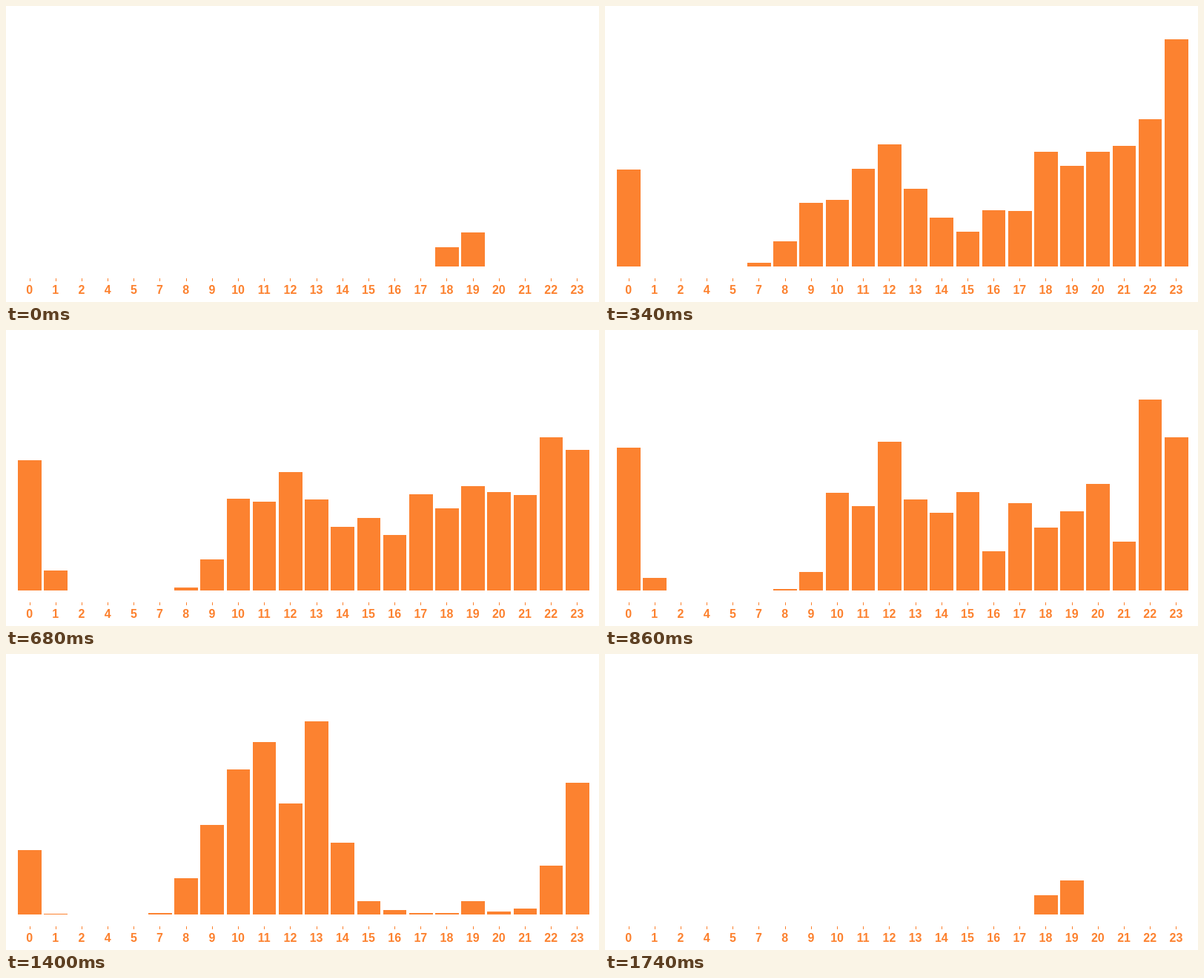
Animation, 800 px wide and 400 px high, one loop 1.76 s. Source, as an HTML page:

```html
<!DOCTYPE html>
<html lang="en">
<head>
<meta charset="utf-8">
<title>Activity by hour</title>
<style>
  html, body { margin: 0; width: 100%; height: 100%; overflow: hidden; background: #fff; }
  svg { display: block; width: 800px; height: 400px; fill: #fc8230; }
  text { font: bold 16px "Liberation Sans", Arial, sans-serif; text-anchor: middle; }
</style>
</head>
<body>
<svg id="chart" viewBox="0 0 800 400"></svg>
<script>
const LOOP = 1760, STEP = 20, BASE = 352;
const PITCH = 35.18, LEFT = 16.2, WIDTH = 31.66;
const hours = [...Array(24).keys()].filter(h => h !== 3 && h !== 6);
const column = hour => hours.indexOf(hour);

// Bar heights: hours 0 to 2, then 7 to 23; hours 4 and 5 stay empty.
const day = (night, rest) => [...night, 0, 0, ...rest];
const mean = (...days) => hours.map((_, i) => days.reduce((sum, d) => sum + d[i], 0) / days.length);
const withPeak = (heights, hour, value) => heights.map((v, i) => i === column(hour) ? value : v);

const quiet = hours.map(h => h === 18 ? 26 : h === 19 ? 46 : 0);
const surge = day([131, 0, 0], [5, 34, 86, 90, 132, 165, 105, 66, 47, 76, 75, 155, 136, 155, 163, 199, 307]);
const steady = day([161, 35, 0], [0, 5, 57, 118, 126, 126, 123, 70, 69, 93, 140, 133, 169, 123, 182, 163, 176]);
const late = day([193, 17, 0], [0, 2, 25, 132, 114, 201, 123, 105, 133, 53, 118, 85, 107, 144, 66, 258, 207]);
const mixed = day([202, 50, 30], [0, 9, 55, 116, 197, 112, 111, 60, 108, 44, 44, 116, 104, 178, 66, 116, 125]);
const noon = day([87, 1, 0], [2, 49, 121, 196, 233, 150, 261, 97, 18, 6, 2, 2, 18, 4, 8, 66, 178]);
const fading = day([120, 22, 0], [0, 30, 70, 115, 130, 135, 140, 105, 120, 130, 43, 43, 100, 87, 174, 203, 160]);

const keys = [
  [0, quiet],
  [174, withPeak(mean(surge, steady, late, mixed), 23, 329)],
  [340, surge],
  [500, steady],
  [696, mean(steady, late)],
  [860, late],
  [1080, mixed],
  [1218, withPeak(mean(mixed, noon), 11, 288)],
  [1400, noon],
  [1566, fading],
  [1740, quiet]
];

const chart = document.getElementById("chart");
function add(tag, attrs) {
  const node = document.createElementNS("http://www.w3.org/2000/svg", tag);
  for (const name in attrs) node.setAttribute(name, attrs[name]);
  return chart.appendChild(node);
}

const bars = hours.map((hour, i) => {
  const start = LEFT + i * PITCH, x = Math.round(start);
  const center = start + WIDTH / 2;
  add("rect", { x: Math.floor(center), y: 368, width: 1, height: 4 });
  add("text", { x: center - 0.4, y: 389 }).textContent = hour;
  return add("rect", { x, width: Math.round(start + WIDTH) - x });
});

function render(time) {
  const t = Math.min(Math.floor(time % LOOP / STEP) * STEP, 1740);
  const next = Math.max(1, keys.findIndex(([at]) => at >= t));
  const [t0, from] = keys[next - 1], [t1, to] = keys[next];
  const p = (t - t0) / (t1 - t0);
  bars.forEach((bar, i) => {
    const height = Math.round(from[i] + (to[i] - from[i]) * p);
    bar.setAttribute("y", BASE - height);
    bar.setAttribute("height", height);
  });
}

let begin;
function tick(now) {
  begin ??= now;
  render(now - begin);
  requestAnimationFrame(tick);
}
render(0);
requestAnimationFrame(tick);
</script>
</body>
</html>
```
